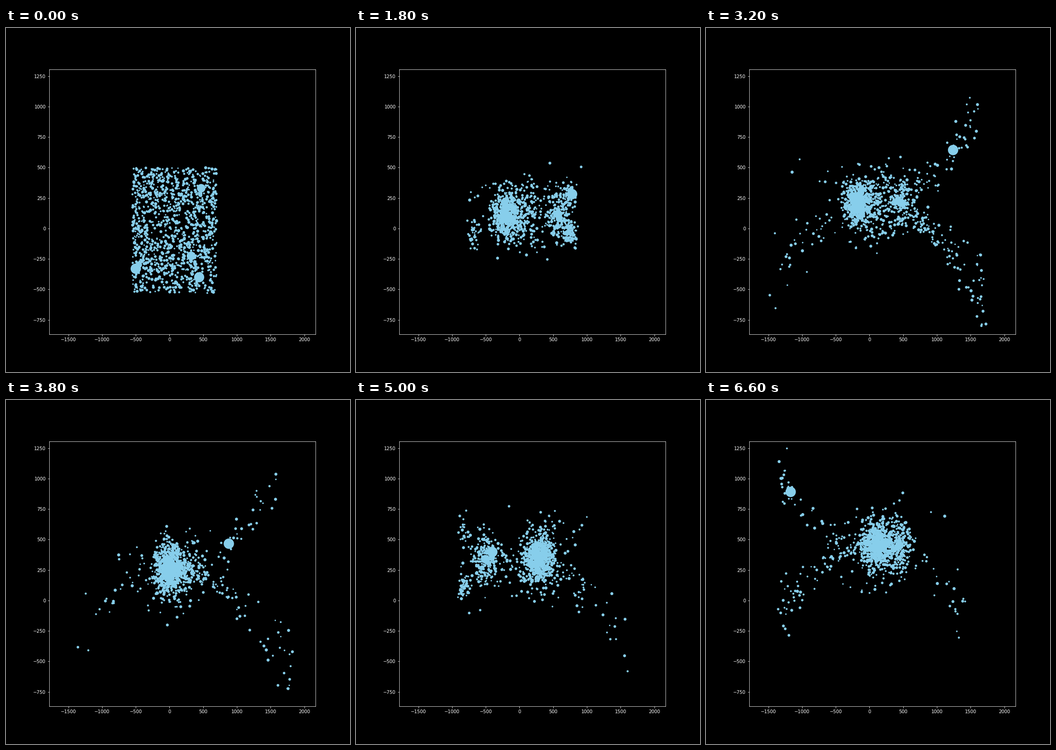
A matplotlib script for the animation above (6670 ms loop, 748x748 px).

```python
import matplotlib.pyplot as plt
import numpy as np
from matplotlib.animation import FuncAnimation

FRAMES, LOOP = 100, 6670
CRUNCH = 1.12  # seconds until the block has fallen together
MID, HALF = np.array([75, -15]), np.array([625, 515])
CORE = np.array([85, 38])
rng = np.random.default_rng(12)


def drift(t):
    """Height of the centre of mass."""
    return 172 + 70 * (t - 2.6)


def stream(reach, sx, sy, jitter):
    """Bodies flung out sideways; far ones take longer to come back."""
    n = len(reach)
    period = 2.3 + 3.2 * (reach / 1750) ** 3
    rise = 3e-4 * reach**2 * rng.normal(1, jitter / 150, n)
    off = rng.normal(0, jitter, (n, 2))

    def path(t):
        s = np.sin(np.pi * max(t - CRUNCH, 0) / period)
        return off + np.column_stack([40 + sx * reach * s,
                                      drift(t) + sy * rise * s**2])
    return path


def cloud(n, x, swing, period, size):
    """Swinging swarm whose bodies orbit its centre."""
    a, b = np.clip(rng.normal(size=(2, n, 2)), -2.4, 2.4) * size
    speed = rng.uniform(0.8, 2, (n, 1))

    def path(t):
        centre = x + swing * np.cos(2 * np.pi * (t - 2.4) / period), drift(t)
        return centre + a * np.cos(speed * t) + b * np.sin(speed * t)
    return path


def take(n, side):
    """Remove and return the n free bodies nearest to one side of the block."""
    global free
    order = np.argsort(np.hypot(*((free - MID) / HALF - side).T))
    picked, free = free[order[:n]], free[order[n:]]
    return picked


def collapse(p):
    """Early infall: the corners lag behind and form an X."""
    u, v = ((p - MID) / HALF).T
    lag = np.abs(u * v) ** 1.5 * np.where((u > 0) & (v < 0), 0.35, 1)
    scale = np.column_stack([0.26 + 0.20 * lag, 0.18 + 0.27 * lag])
    return CORE + (p - MID) * scale + rng.normal(0, 8, p.shape)


free = MID + HALF * rng.uniform(-1, 1, (1200, 2))
starts, paths = [], []

# corner streams leave on the far side
for n, sx, sy, reach in [(110, 1, -1, 1800), (60, 1, 1, 1600),
                         (35, -1, -1, 1500), (5, -1, 1, 1250)]:
    starts.append(take(n, (-sx, -sy)))
    radii = 900 + (reach - 900) * rng.random(n) ** 1.6
    paths.append(stream(radii, sx, sy, 38))

# left part, core, companions, halo
SECOND, FIRST = (110, 620, 5), (25, -280, 6)
for n, side, orbit, size in [(170, (-1, 0), SECOND, (90, 105)),
                             (560, (0, 0), FIRST, (100, 88)),
                             (150, (0, 0), (180, -160, 6), (140, 130)),
                             (110, (0, 0), (100, -60, 6), (300, 180))]:
    starts.append(take(n, side))
    paths.append(cloud(n, *orbit, size))

diam = rng.uniform(3, 6.8, sum(map(len, starts)))

# heavy bodies
for d, start, path in [
        (22.5, (-500, -330), stream(np.array([1250.0]), 1, 1, 0)),
        (18.5, (470, 330), cloud(1, *SECOND, (0, 0))),
        (19, (320, -225), cloud(1, *FIRST, (40, 40))),
        (22, (440, -400), cloud(1, *FIRST, (40, 40))),
        (14, (-455, -298), cloud(1, *SECOND, (60, 60)))]:
    starts.append(np.array([start], float))
    paths.append(path)
    diam = np.append(diam, d)

start = np.concatenate(starts)
fallen = collapse(start)


def position(t):
    fall = start + (fallen - start) * (min(t, 1) / 0.87) ** 2
    g = np.clip((t - 0.87) / 0.6, 0, 1)
    g = g * g * (3 - 2 * g)
    return fall * (1 - g) + g * np.concatenate([p(t) for p in paths])


plt.style.use("dark_background")
plt.rcParams["font.family"] = "DejaVu Sans"
fig, ax = plt.subplots(figsize=(10.389, 10.389), dpi=72)
fig.subplots_adjust(left=0.125, right=0.9, bottom=0.11, top=0.88)
fig.set_facecolor("black")
ax.set_facecolor("black")
ax.set(xlim=(-1787, 2167), ylim=(-867, 1306))
dots = ax.scatter(*start.T, s=diam**2, c="skyblue", linewidths=0)


def update(k):
    dots.set_offsets(position(k * LOOP / (FRAMES - 1) / 1000))
    return (dots,)


anim = FuncAnimation(fig, update, frames=FRAMES, interval=LOOP / FRAMES,
                     repeat=True)
plt.show()
```
